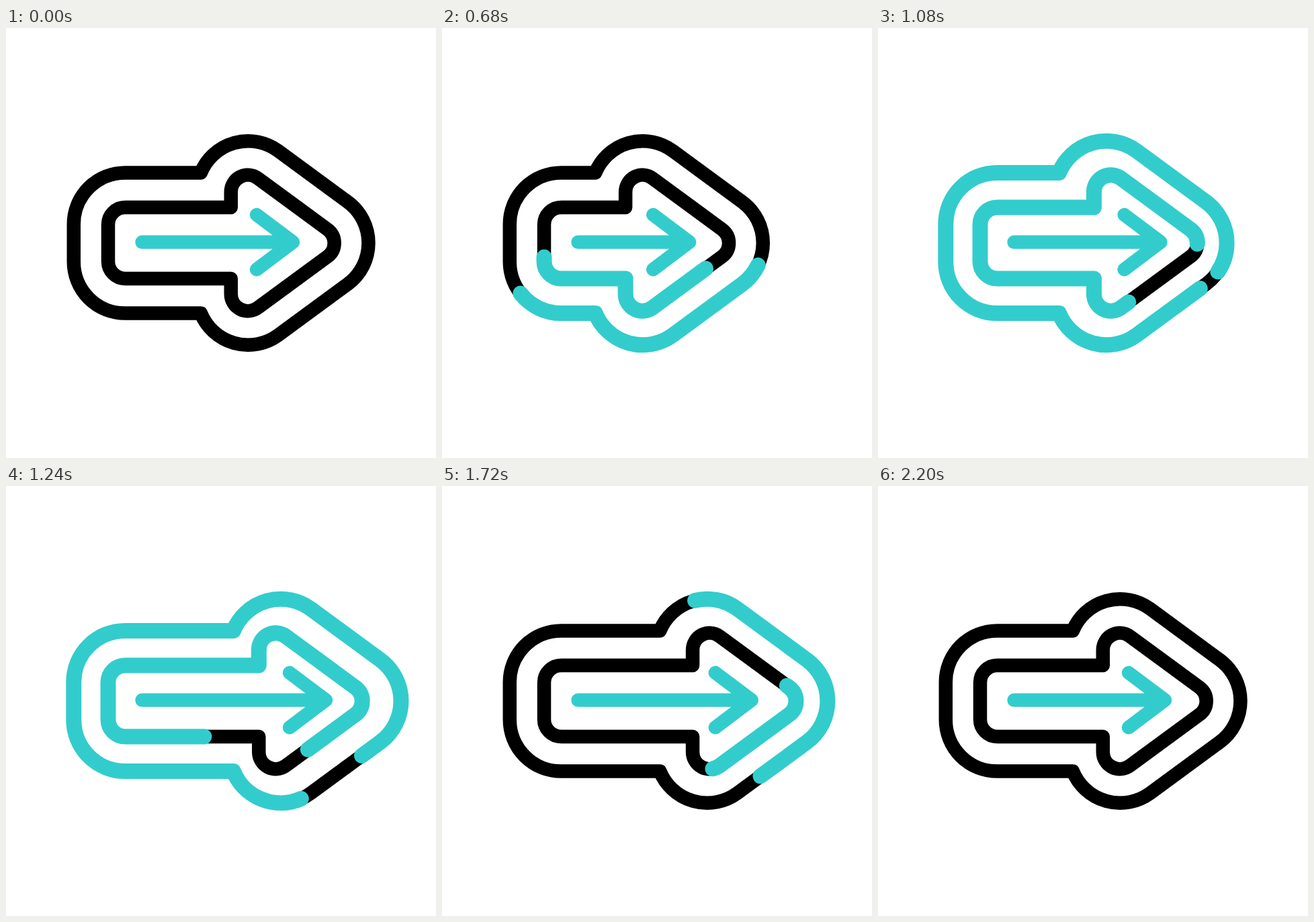
Write an HTML page that moves like this. It is 640 by 640 pixels and loops after 3000 ms.

```html
<!DOCTYPE html>
<html lang="en">
<head>
<meta charset="utf-8">
<title>Arrow</title>
<style>
  html, body { margin: 0; width: 100%; height: 100%; overflow: hidden; background: #fff; }
  svg { display: block; width: 100%; height: 100%; }
  path { fill: none; stroke-linecap: round; stroke-linejoin: round; }
  .line { stroke: #000; stroke-width: 20.5; }
  .glow { stroke: #33cccc; stroke-width: 23; }
  .arrow { stroke: #33cccc; stroke-width: 20.3; }
</style>
</head>
<body>
<svg viewBox="0 0 640 640">
  <path class="line" id="outerLine"/>
  <path class="line" id="innerLine"/>
  <path class="glow" id="outerGlow" pathLength="1"/>
  <path class="glow" id="innerGlow" pathLength="1"/>
  <path class="arrow" id="arrow"/>
</svg>
<script>
const LOOP = 3000, STEP = 40;
const $ = id => document.getElementById(id);

// Sideways shift of each head: [ms, px]
const outerShift = [[200, 0], [400, -22], [800, -69], [960, -61], [1240, 48.5], [1320, 59.5],
  [1430, 64.5], [1560, 58], [1880, 10], [2050, 0]];
const innerShift = [[200, 0], [400, -27.5], [780, -66], [960, -50], [1240, 41.5],
  [1470, 67], [1560, 64], [1880, 10], [2050, 0]];
const arrowShift = [[200, 0], [400, -28], [770, -62], [960, -45], [1240, 49],
  [1430, 65], [1560, 60], [1880, 7], [2040, 0]];

// Monotone cubic curve through the points, flat at extremes and ends
function curve(pts, t) {
  const n = pts.length - 1;
  if (t <= pts[0][0]) return pts[0][1];
  if (t >= pts[n][0]) return pts[n][1];
  const slope = i => (pts[i + 1][1] - pts[i][1]) / (pts[i + 1][0] - pts[i][0]);
  const tangent = i => {
    if (i === 0 || i === n) return 0;
    const a = slope(i - 1), b = slope(i);
    return a * b <= 0 ? 0 : 2 * a * b / (a + b);
  };
  let i = 0;
  while (t > pts[i + 1][0]) i++;
  const [t0, x0] = pts[i], [t1, x1] = pts[i + 1];
  const d = t1 - t0, u = (t - t0) / d, v = 1 - u;
  return x0 * v * v * (1 + 2 * u) + x1 * u * u * (3 - 2 * u)
    + d * u * v * (tangent(i) * v - tangent(i + 1) * u);
}

function ease(t, from, to) {
  const u = Math.min(1, Math.max(0, (t - from) / (to - from)));
  return u * u * (3 - 2 * u);
}

// Closed outline, clockwise from its rightmost point.
// r: head radius, c: tail corner radius, neck: x where the head begins
function outline(dx, r, c, left, top, neck, step) {
  const cx = 360 + dx, tip = 463.5 + dx, nx = 0.592 * r, ny = 0.806 * r;
  const low = 640 - top, arc = (k, x, y) => `A${k} ${k} 0 0 1 ${x} ${y}`;
  const n = neck + dx;
  return `M${tip + r} 320` + arc(r, tip + nx, 320 + ny)
    + `L${cx + nx} ${396 + ny}` + arc(r, n, step ? 396 : low)
    + `L${n} ${low}H${left + c}` + arc(c, left, low - c)
    + `V${top + c}` + arc(c, left + c, top)
    + `H${n}V${step ? 244 : top}` + arc(r, cx + nx, 244 - ny)
    + `L${tip + nx} ${320 - ny}` + arc(r, tip + r, 320) + 'Z';
}

function setGlow(el, d, start, end, offset) {
  const len = end - start;
  el.style.display = len > 0 ? '' : 'none';
  el.setAttribute('d', d);
  el.setAttribute('stroke-dasharray', len >= 1 ? 'none' : `${len} ${1 - len}`);
  el.setAttribute('stroke-dashoffset', -(start + offset));
}

function draw(t) {
  const outer = outline(curve(outerShift, t), 76, 76.5, 100.8, 215.4, 290, false);
  const inner = outline(curve(innerShift, t), 25.2, 25.5, 152, 267, 334.8, true);
  $('outerLine').setAttribute('d', outer);
  $('innerLine').setAttribute('d', inner);
  setGlow($('outerGlow'), outer, ease(t, 1040, 2150), ease(t, 315, 1165), 8.85e-5 * (t - 320));
  setGlow($('innerGlow'), inner, ease(t, 930, 2030), ease(t, 200, 1300), 0.042 + 9.35e-5 * (t - 400));
  const x = curve(arrowShift, t);
  $('arrow').setAttribute('d',
    `M202.5 318.7H${427 + x}M${373 + x} 278L${427 + x} 318.7L${373 + x} 359.4`);
}

const begin = performance.now();
function tick() {
  const t = (performance.now() - begin) % LOOP;
  draw(Math.floor(t / STEP) * STEP);
  requestAnimationFrame(tick);
}
tick();
</script>
</body>
</html>
```
